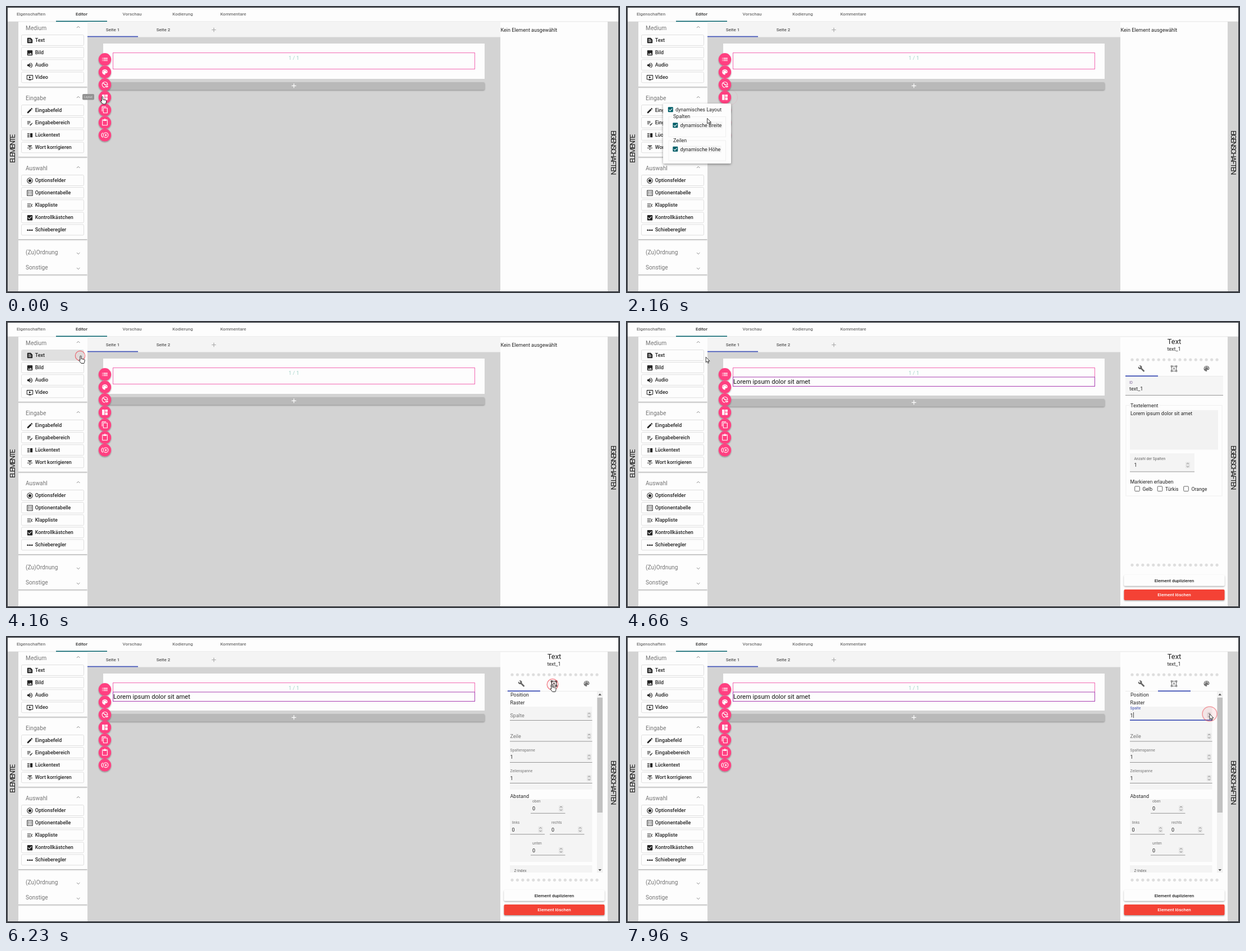
Write an HTML page that moves like this. It is 1093 by 512 pixels and loops after 8 s.

```html
<!DOCTYPE html>
<html lang="de">
<head>
<meta charset="utf-8">
<title>Editor</title>
<style>
html,body{margin:0;width:100%;height:100%;overflow:hidden;background:#fdfdfd}
svg{display:block;font-family:Roboto,"Open Sans",sans-serif}
</style>
</head>
<body>
<svg id="stage" width="1093" height="512" viewBox="0 0 1093 512" xmlns="http://www.w3.org/2000/svg"></svg>
<script>
const PINK = '#ff4081', BLUE = '#3f51b5', TEAL = '#00606a', DARK = '#242424', GREY = '#757575';

const ICONS = {
  text: 'M20.41 8.41l-4.83-4.83c-.37-.37-.88-.58-1.41-.58H5c-1.1 0-2 .9-2 2v14c0 1.1.9 2 2 2h14c1.1 0 2-.9 2-2V9.83c0-.53-.21-1.04-.59-1.42zM7 7h7v2H7V7zm10 10H7v-2h10v2zm0-4H7v-2h10v2z',
  image: 'M21 19V5c0-1.1-.9-2-2-2H5c-1.1 0-2 .9-2 2v14c0 1.1.9 2 2 2h14c1.1 0 2-.9 2-2zM8.5 13.5l2.5 3.01L14.5 12l4.5 6H5l3.5-4.5z',
  audio: 'M3 9v6h4l5 5V4L7 9H3zm13.5 3c0-1.77-1.02-3.29-2.5-4.03v8.05c1.48-.73 2.5-2.25 2.5-4.02zM14 3.23v2.06c2.89.86 5 3.54 5 6.71s-2.11 5.85-5 6.71v2.06c4.01-.91 7-4.49 7-8.77s-2.99-7.86-7-8.77z',
  video: 'M21 3H3c-1.1 0-2 .9-2 2v12c0 1.1.9 2 2 2h5v2h8v-2h5c1.1 0 2-.9 2-2V5c0-1.1-.9-2-2-2zm0 14H3V5h18v12zm-5-6l-7 4V7z',
  edit: 'M3 17.25V21h3.75L17.81 9.94l-3.75-3.75L3 17.25zM20.71 7.04c.39-.39.39-1.02 0-1.41l-2.34-2.34c-.39-.39-1.02-.39-1.41 0l-1.83 1.83 3.75 3.75 1.83-1.83z',
  note: 'M3 10h11v2H3v-2zm0-2h11V6H3v2zm0 8h7v-2H3v2zm15-3.1l.7-.7c.4-.4 1-.4 1.4 0l.7.7c.4.4.4 1 0 1.4l-.7.7-2.1-2.1zm-.7.7l-5.3 5.3V21h2.1l5.3-5.3-2.1-2.1z',
  gap: 'M3 15h8v-2H3v2zm0 4h8v-2H3v2zm0-8h8V9H3v2zm0-6v2h8V5H3zm10 0h8v14h-8V5z',
  strike: 'M10 19h4v-3h-4v3zM5 4v3h5v3h4V7h5V4H5zM3 14h18v-2H3v2z',
  radio: 'M12 7a5 5 0 1 0 0 10 5 5 0 1 0 0-10zm0-5a10 10 0 1 0 0 20 10 10 0 1 0 0-20zm0 18a8 8 0 1 1 0-16 8 8 0 1 1 0 16z',
  table: 'M2 2h20v20H2zM4 4v16h16V4zM6 7h3v2H6zm5 0h2v2h-2zm4 0h3v2h-3zM6 11h3v2H6zm5 0h2v2h-2zm4 0h3v2h-3zM6 15h3v2H6zm5 0h2v2h-2zm4 0h3v2h-3z',
  drop: 'M3 18h13v-2H3v2zm0-5h10v-2H3v2zm0-7v2h13V6H3zm18 9.6L17.4 12 21 8.4 19.6 7l-5 5 5 5z',
  check: 'M19 3H5c-1.1 0-2 .9-2 2v14c0 1.1.9 2 2 2h14c1.1 0 2-.9 2-2V5c0-1.1-.9-2-2-2zm-9 14l-5-5 1.4-1.4 3.6 3.6 7.6-7.6L19 8l-9 9z',
  slider: 'M2 12a2.5 2.5 0 0 1 4.8-1h2.9a2.5 2.5 0 0 1 4.6 0h2.9a2.5 2.5 0 1 1 0 2h-2.9a2.5 2.5 0 0 1-4.6 0H6.8A2.5 2.5 0 0 1 2 12z',
  list: 'M3 13h2v-2H3v2zm0 4h2v-2H3v2zm0-8h2V7H3v2zm4 4h14v-2H7v2zm0 4h14v-2H7v2zM7 7v2h14V7H7z',
  palette: 'M12 3a9 9 0 0 0 0 18c.83 0 1.5-.67 1.5-1.5 0-.39-.15-.74-.39-1.01-.23-.26-.38-.61-.38-.99 0-.83.67-1.5 1.5-1.5H16c2.76 0 5-2.24 5-5 0-4.42-4.03-8-9-8zM6.5 12a1.5 1.5 0 1 1 0-3 1.5 1.5 0 0 1 0 3zm3-4a1.5 1.5 0 1 1 0-3 1.5 1.5 0 0 1 0 3zm5 0a1.5 1.5 0 1 1 0-3 1.5 1.5 0 0 1 0 3zm3 4a1.5 1.5 0 1 1 0-3 1.5 1.5 0 0 1 0 3z',
  hide: 'M12 2a10 10 0 1 0 0 20h1l-1-2a8 8 0 0 1-6.3-12.9l7.6 7.6c1.500-1.500 4.500-2.200 7-1.300l1.500.6A10 10 0 0 0 12 2zm0 2a8 8 0 0 1 7.900 7c-1.600-.3-3.500-.1-5.200.6L7.100 5.700A8 8 0 0 1 12 4zM13 18c1.500-4 8.500-4 10 0-1.500 4-8.500 4-10 0zm5-1.500a1.500 1.500 0 1 0 0 3 1.500 1.500 0 1 0 0-3z',
  layout: 'M3 3h8v18H3zM13 3h8v8h-8zM13 13h8v8h-8z',
  copy: 'M16 1H4c-1.1 0-2 .9-2 2v14h2V3h12V1zm3 4H8c-1.1 0-2 .9-2 2v14c0 1.1.9 2 2 2h11c1.1 0 2-.9 2-2V7c0-1.100-.9-2-2-2zm0 16H8V7h11v14z',
  paste: 'M19 2h-4.200a3 3 0 0 0-5.600 0H5c-1.100 0-2 .9-2 2v16c0 1.100.9 2 2 2h14c1.100 0 2-.9 2-2V4c0-1.100-.9-2-2-2zm-7 0a1 1 0 1 1 0 2 1 1 0 0 1 0-2zm7 18H5V4h2v3h10V4h2v16z',
  twice: 'M16 8h-2v3h-3v2h3v3h2v-3h3v-2h-3zM2 12c0-2.800 1.600-5.200 4-6.300V3.500a9 9 0 0 0 0 17v-2.200A7 7 0 0 1 2 12zm13-9a9 9 0 1 0 0 18 9 9 0 1 0 0-18zm0 16a7 7 0 1 1 0-14 7 7 0 1 1 0 14z',
  wrench: 'M22.7 19l-9.1-9.1c.9-2.3.4-5-1.5-6.9-2-2-5-2.4-7.4-1.3L9 6 6 9 1.6 4.7C.4 7.1.9 10.1 2.9 12.1c1.9 1.9 4.6 2.4 6.900 1.500l9.100 9.100c.4.4 1 .4 1.400 0l2.300-2.300c.5-.4.5-1.100.1-1.400z',
  shapes: 'M23 7V1h-6v2H7V1H1v6h2v10H1v6h6v-2h10v2h6v-6h-2V7h2zM3 3h2v2H3V3zm2 18H3v-2h2v2zm12-2H7v-2H5V7h2V5h10v2h2v10h-2v2zm4 2h-2v-2h2v2zM19 5V3h2v2h-2zm-5.300 9h-3.500l-.7 2H7.900l3.400-9h1.400l3.400 9h-1.600l-.8-2zm-3-1.300h2.600L12 8.900l-1.300 3.800z'
};

// Markup helpers
const rect = (x, y, w, h, fill, more = '') => `<rect x="${x}" y="${y}" width="${w}" height="${h}" fill="${fill}" ${more}/>`;
const box = (x, y, w, h, stroke, more = '') => rect(x, y, w, h, 'none', `stroke="${stroke}" ${more}`);
const label = (s, x, y, size = 9, fill = DARK, more = '') => `<text x="${x}" y="${y}" font-size="${size}" fill="${fill}" ${more}>${s}</text>`;
const mid = (s, x, y, size, fill, weight = 400) => label(s, x, y, size, fill, `text-anchor="middle" font-weight="${weight}"`);
const path = (d, stroke, w = 1) => `<path d="${d}" fill="none" stroke="${stroke}" stroke-width="${w}"/>`;
const icon = (name, cx, cy, size, fill, id = '') =>
  `<path ${id && `id="${id}"`} d="${ICONS[name]}" fill="${fill}" fill-rule="evenodd" transform="translate(${cx - size / 2} ${cy - size / 2}) scale(${size / 24})"/>`;
const group = (id, s) => `<g id="${id}">${s}</g>`;
const stepper = (x, y) => rect(x - 4, y - 5.5, 8, 11, '#e6e6e6', 'rx="1"') +
  path(`M${x - 2} ${y - 1.7}l2-2 2 2M${x - 2} ${y + 1.7}l2 2 2-2`, '#777', .9);
const tick = (x, y) => rect(x - 4.5, y - 4.5, 9, 9, TEAL, 'rx="1"') + path(`M${x - 2.8} ${y}l2 2.1 3.800-4`, '#fff', 1.1);
const plus = (x, y, r, c) => path(`M${x - r} ${y}h${2 * r}M${x} ${y - r}v${2 * r}`, c, 1.2);

function topBars() {
  const tabs = ['Eigenschaften', 'Editor', 'Vorschau', 'Kodierung', 'Kommentare'];
  return rect(0, 0, 1093, 512, '#3c3f45') + rect(3, 3, 1087, 506, '#fdfdfd') +
    tabs.map((s, i) => mid(s, 44.5 + 90 * i, 17, 8, i == 1 ? '#333' : '#707070', 500)).join('') +
    rect(3, 27.5, 1087, .8, '#ddd') + rect(89, 26.5, 91, 1.6, TEAL) +
    rect(3, 28, 19, 481, '#d3d3d3') + rect(1071, 28, 19, 481, '#d3d3d3') + rect(145, 28, 735, 481, '#d3d3d3') +
    rect(145, 28, 735, 27.5, '#f4f4f4') + rect(145, 53.7, 90, 1.700, BLUE) +
    mid('Seite 1', 190, 45, 8, '#555', 500) + mid('Seite 2', 280, 45, 8, '#555', 500) + plus(370, 42.5, 3.8, '#aaa') +
    `<text transform="translate(15.5 280) rotate(-90)" font-size="13" letter-spacing="-1.9" fill="#222">ELEMENTE</text>` +
    `<text transform="translate(1077 222) rotate(90)" font-size="13" letter-spacing="-1.9" fill="#222">EIGENSCHAFTEN</text>`;
}

function palettePanel() {
  const cards = [
    ['Medium', 43, 144, 61, [['text', 'Text'], ['image', 'Bild'], ['audio', 'Audio'], ['video', 'Video']]],
    ['Eingabe', 168, 269, 186, [['edit', 'Eingabefeld'], ['note', 'Eingabebereich'], ['gap', 'Lückentext'], ['strike', 'Wort korrigieren']]],
    ['Auswahl', 293, 416, 311, [['radio', 'Optionsfelder'], ['table', 'Optionentabelle'], ['drop', 'Klappliste'], ['check', 'Kontrollkästchen'], ['slider', 'Schieberegler']]],
    ['(Zu)Ordnung', 443, 0, 0, []],
    ['Sonstige', 470, 479, 0, []]
  ];
  return cards.map(([name, y, end, first, rows]) => {
    let s = label(name, 35, y, 10.2, GREY);
    s += rows.length ? path(`M126 ${y - 4}l2.700-2.700 2.700 2.700`, '#888') : path(`M126 ${y - 3}l2.700 2.700 2.700-2.700`, '#888');
    if (end) s += rect(22, end, 122.5, 1.4, '#b4b4b4') + rect(22, end + 1.4, 122.5, 1.2, '#e4e4e4');
    return s + rows.map(([ic, t], i) => {
      const c = first + 22.1 * i;
      return box(27.5, c - 9.5, 111, 19, '#dedede', 'rx="2"') + (t == 'Text' ? rect(28, c - 9, 110, 18, '#e0e0e0', 'id="hover" rx="2"') : '') +
        icon(ic, 42.5, c + .5, 12.5, DARK) + label(t, 51.7, c + 3, 9, DARK, 'font-weight="500"');
    }).join('');
  }).join('');
}

function canvasArea() {
  const names = ['list', 'palette', 'hide', 'layout', 'copy', 'paste', 'twice'];
  return `<rect id="page" x="173" y="67" width="679" fill="#fdfdfd"/>` +
    group('bar', rect(173, 136, 679, 13.300, '#b9b9b9', 'rx="2" filter="url(#soft)"') + plus(512.5, 142.3, 4, '#fff')) +
    `<rect id="section" x="190.5" y="83.500" width="644" fill="none" stroke="#f268b2"/>` +
    mid('1 / 1', 512.5, 95.500, 9.300, '#a3d3c8') +
    group('element', box(190.500, 100, 644, 16.500, '#a83cb0') + label('Lorem ipsum dolor sit amet', 191, 112, 11.200, '#111')) +
    names.map((n, i) => {
      const y = 95.300 + 22.500 * i;
      return `<circle cx="176" cy="${y}" r="11.200" fill="${PINK}" filter="url(#soft)"/>` + icon(n, 176, y, 13, '#fff');
    }).join('') +
    group('tip', rect(136, 157, 21, 10.500, '#929292', 'rx="2"') + mid('Layout', 146.500, 164, 5, '#ddd'));
}

function layoutMenu() {
  return group('menu', rect(66, 174, 121, 107, '#fdfdfd', 'rx="2" filter="url(#deep)"') +
    box(76, 197.500, 101.500, 36, '#f0f0f0') + box(76, 240, 101.500, 36, '#f0f0f0') +
    rect(82, 192, 34, 10, '#fdfdfd') + rect(82, 235, 28, 10, '#fdfdfd') +
    rect(95, 206, 77, 13, '#f6f6f6') + rect(95, 249, 75, 13, '#f6f6f6') +
    tick(79.300, 184.800) + label('dynamisches Layout', 88, 188.300) + label('Spalten', 84, 200.300) +
    tick(87.800, 212.800) + label('dynamische Breite', 96.500, 216) + label('Zeilen', 84, 243) +
    tick(87.800, 255.300) + label('dynamische Höhe', 96.500, 258.500));
}

function generalTab() {
  return rect(889, 99, 174, 33.500, '#f5f5f5') + rect(889, 132, 174, .9, '#8c8c8c') +
    label('ID', 896, 111.500, 6.500, '#80659a') + label('text_1', 896, 123.500) +
    box(890, 150.500, 171, 161.500, '#f0f0f0') + rect(896, 146, 54, 10, '#fdfdfd') + label('Textelement', 898, 153.500) +
    rect(897, 159, 157, 70.500, '#f2f2f2') + label('Lorem ipsum dolor sit amet', 898, 168) +
    rect(897, 236, 115, 33, '#f4f4f4') + rect(897, 268.500, 115, .9, '#8c8c8c') +
    label('Anzahl der Spalten', 904.500, 248, 6.700, '#666') + label('1', 904.500, 260) + stepper(1000, 257) +
    label('Markieren erlauben', 897.500, 290) +
    [['Gelb', 910], ['Türkis', 950.500], ['Orange', 997]].map(([s, x]) =>
      box(x - 4.300, 295, 8.600, 8.600, '#666', 'rx="1"') + label(s, x + 9.500, 302.500, 8.700)).join('');
}

function positionTab() {
  const line = y => rect(897, y, 146.500, .9, '#8c8c8c');
  const gap = (s, x, y) => label(s, x, y, 6.700, '#777') + label('0', x, y + 14) +
    rect(x - 3, y + 18.800, 61.500, .9, '#8c8c8c') + stepper(x + 51, y + 10.700);
  return `<g clip-path="url(#scroll)">` + label('Position', 898, 108) + label('Raster', 897.500, 122.300) +
    rect(897, 126, 146.500, 148, '#f4f4f4') +
    group('empty', label('Spalte', 897.500, 144.500, 9, GREY) + line(150)) +
    group('filled', label('Spalte', 897.500, 131, 6.700, BLUE) + label('1', 897.500, 144.500) + rect(903, 136, .8, 10, '#222') + rect(897, 149.300, 146.500, 1.700, BLUE)) +
    label('Zeile', 897.500, 181.500, 9, GREY) + line(187.500) +
    label('Spaltenspanne', 897.500, 205.500, 6.700, '#777') + label('1', 897.500, 219) + line(225) +
    label('Zeilenspanne', 897.500, 243, 6.700, '#777') + label('1', 897.500, 256.700) + line(262) +
    [141, 178.700, 216, 253.500].map(y => stepper(1038, y)).join('') +
    rect(897, 291, 146.500, 112, '#f4f4f4') + label('Abstand', 897.500, 289) +
    gap('oben', 937, 297) + gap('links', 900.500, 334.500) + gap('rechts', 971, 334.500) + gap('unten', 937, 371.700) +
    rect(897, 409, 146.500, 20, '#f4f4f4') + label('Z-Index', 904.500, 421.300, 6.700, '#666') + `</g>` +
    rect(1052, 99, 10.500, 323, '#f1f1f1') + rect(1052.500, 110, 9.500, 205, '#c1c1c1') +
    `<path d="M1054.500 106h5.500l-2.800-3.500zM1054.500 416h5.500l-2.800 3.500z" fill="#555"/>`;
}

function properties() {
  let dots = '';
  for (let i = 0; i < 17; i++) for (const y of [69, 435.300])
    dots += `<circle cx="${901 + 9.440 * i}" cy="${y}" r="2.600" fill="#dedede"/>`;
  return group('none', label('Kein Element ausgewählt', 880.500, 46)) +
    group('props', mid('Text', 976, 41, 13, DARK) + mid('text_1', 975.500, 53, 9, DARK) + dots +
      icon('wrench', 917.500, 85, 12.500, '#666') + icon('shapes', 975.500, 85, 12.500, GREY, 'shapes') + icon('palette', 1033.500, 85, 13.500, GREY) +
      rect(889, 98.300, 174, .7, '#e2e2e2') + group('general', generalTab()) + group('position', positionTab()) +
      rect(0, 97.300, 58, 1.800, BLUE, 'id="ink"') +
      rect(886.500, 453, 179, 19.500, '#fdfdfd', 'rx="2" filter="url(#soft)"') + mid('Element duplizieren', 976, 465.700, 8, DARK, 500) +
      rect(886.500, 479, 179, 19, '#f44336', 'rx="2" filter="url(#soft)"') + mid('Element löschen', 976, 491.300, 8, '#fff', 500));
}

const stage = document.getElementById('stage');
const shadow = (id, y, blur, a) => `<filter id="${id}" x="-30%" y="-30%" width="160%" height="190%"><feDropShadow dx="0" dy="${y}" stdDeviation="${blur}" flood-opacity="${a}"/></filter>`;
stage.innerHTML = `<defs>${shadow('soft', 1.300, 1.200, .38)}${shadow('deep', 1.500, 2, .4)}<clipPath id="scroll">${rect(885, 99, 170, 323, '#000')}</clipPath></defs>` +
  topBars() + palettePanel() + canvasArea() + layoutMenu() + properties() +
  `<circle id="trace" cx="185.300" cy="163" r="13.300" fill="none" stroke="#e8607a" stroke-opacity=".13"/>` +
  `<circle id="ring" fill="#f04050" stroke="#ee3b48"/>` +
  group('cursor',
    `<path id="hand" d="M-1.100.8c0-1.600 2.200-1.600 2.200 0V5l4.800.9c1 .2 1.400.9 1.300 1.800l-.6 3.300-.8 2H.9l-3.600-4.400c-.8-1 .3-2 1.200-1.300l.4.5z" fill="#fff" stroke="#111" stroke-width=".9"/>` +
    `<path id="arrow" d="M0 0V9.600L2.200 7.600 3.700 11 5.200 10.300 3.800 7.200H6.800z" fill="#fff" stroke="#222" stroke-width=".9"/>`);

const el = {};
stage.querySelectorAll('[id]').forEach(e => el[e.id] = e);
const show = (id, on) => el[id].style.display = on ? '' : 'none';
const span = (t, a, b) => Math.min(1, Math.max(0, (t - a) / (b - a)));
const ease = p => p * p * (3 - 2 * p);

// Cursor moves: start, end, x, y
const HOME = [171.500, 162];
const MOVES = [
  [30, 230, 183, 162.500], [1460, 2260, 143, 202], [3760, 3760, 133, 62.500],
  [4600, 5060, 324, 99], [5330, 5460, 972, 86.500], [6560, 7000, 1039, 139]
];
// Clicks: start, x, y
const CLICKS = [[630, 185, 163], [3760, 132, 62], [5730, 973, 86.500], [7160, 1039, 139]];
const within = (t, a, b) => t >= a && t < b;

function render(t) {
  let [x, y] = HOME;
  for (const [a, b, tx, ty] of MOVES) {
    if (t < a) break;
    const p = a == b ? 1 : ease(span(t, a, b));
    x += (tx - x) * p;
    y += (ty - y) * p;
  }
  el.cursor.setAttribute('transform', `translate(${x} ${y})`);
  const hand = t < 1800 || within(t, 3760, 4660) || within(t, 5420, 6680);
  show('hand', hand);
  show('arrow', !hand);

  const click = CLICKS.find(c => within(t, c[0], c[0] + 830));
  show('ring', click && t > click[0]);
  if (click) {
    const p = span(t, click[0], click[0] + 800);
    const attrs = { cx: click[1], cy: click[2], r: 13 * p ** .585, 'stroke-opacity': 1.050 - .6 * p, 'fill-opacity': .08 * p, 'stroke-width': 1 + .6 * p * p };
    for (const k in attrs) el.ring.setAttribute(k, attrs[k]);
  }
  show('trace', within(t, 1460, 3760));

  el.tip.style.opacity = 1 - span(t, 30, 200);
  show('menu', within(t, 1030, 3760));
  el.menu.style.opacity = span(t, 1000, 1150);
  show('hover', within(t, 3760, 4640));

  const added = t >= 4260, moved = t >= 6190, typed = t >= 7600;
  show('element', added);
  show('props', added);
  show('none', !added);
  el.page.setAttribute('height', added ? 66 : 63);
  el.section.setAttribute('height', added ? 33 : 29);
  el.bar.setAttribute('transform', `translate(0 ${added ? 3 : 0})`);
  show('general', !moved);
  show('position', moved);
  el.ink.setAttribute('x', 889 + 58 * ease(span(t, 6190, 6450)));
  el.shapes.setAttribute('fill', moved && t < 7300 ? DARK : GREY);
  show('empty', !typed);
  show('filled', typed);
}

function loop() {
  render(performance.now() % 8000);
  requestAnimationFrame(loop);
}
loop();
</script>
</body>
</html>
```
